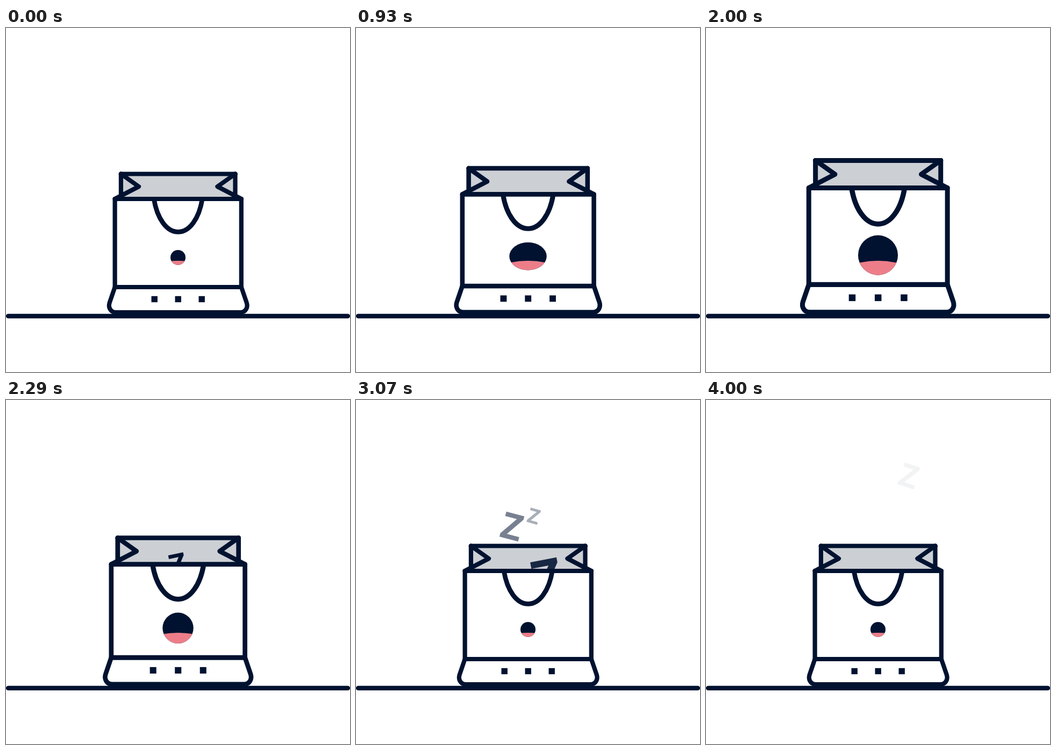
Write an HTML page with a canvas that moves like this. It is 640 px wide and 640 px high and loops after 4.71 s.

```html
<!DOCTYPE html>
<html lang="en">
<head>
<meta charset="utf-8">
<title>Yawning bag</title>
<style>
  html, body { margin: 0; width: 100%; height: 100%; overflow: hidden; background: #fff; }
  canvas { display: block; width: 100%; height: 100%; }
</style>
</head>
<body>
<canvas id="stage" width="640" height="640"></canvas>
<script>
const ctx = document.getElementById('stage').getContext('2d');
const NAVY = '#001230', GREY = '#cccfd4', PINK = '#ed7e89';
const LOOP = 4710, FPS = 14, LAST_STEP = 56;
const CENTER = 320, FLOOR = 532;

// Bag measures from the middle of its foot; widths are halves
const BACK = 106.3, BODY = 117.6, RIM = -214, TOP = -260.5, FOLD = -50, FOOT = -3;

// Where and when each Z fades out, and its height then
const ZS = [
  { end: 3450, x: 333, y: 185.5, size: 21.8 },
  { end: 3666, x: 296, y: 160, size: 34.1 },
  { end: 4055, x: 378.3, y: 133, size: 41 }
];

function smooth(from, to, t) {
  const u = Math.min(1, Math.max(0, (t - from) / (to - from)));
  return u * u * (3 - 2 * u);
}

function strokeLine(...points) {
  ctx.beginPath();
  points.forEach(([x, y]) => ctx.lineTo(x, y));
  ctx.stroke();
}

function inBagSpace(scale, draw) {
  ctx.save();
  ctx.translate(CENTER + .2, FLOOR);
  ctx.scale(scale, scale);
  ctx.lineWidth = 8.2;
  draw();
  ctx.restore();
}

function drawBack() {
  ctx.fillStyle = GREY;
  ctx.fillRect(-BACK, TOP, BACK * 2, RIM - TOP);
  strokeLine([-BACK, TOP], [BACK, TOP]);
  for (const side of [-1, 1]) {
    strokeLine([side * BACK, TOP], [side * BACK, RIM - 6]);
    strokeLine([side * BACK, TOP], [side * 73.2, -237], [side * BODY, RIM]);
  }
}

function drawFront() {
  ctx.fillStyle = '#fff';
  ctx.beginPath();
  ctx.moveTo(-BODY, FOLD);
  ctx.lineTo(-127.5, -21);
  ctx.bezierCurveTo(-130.5, -12, -125.5, FOOT, -116, FOOT);
  ctx.lineTo(116, FOOT);
  ctx.bezierCurveTo(125.5, FOOT, 130.5, -12, 127.5, -21);
  ctx.lineTo(BODY, FOLD);
  ctx.closePath();
  ctx.fill();
  ctx.stroke();

  ctx.fillRect(-BODY, RIM, BODY * 2, FOLD - RIM);
  ctx.strokeRect(-BODY, RIM, BODY * 2, FOLD - RIM);

  ctx.lineWidth = 8.7;
  ctx.lineCap = 'butt';
  ctx.beginPath();
  ctx.moveTo(-45, RIM);
  ctx.bezierCurveTo(-39, -177, -21, -152.6, 0, -152.6);
  ctx.bezierCurveTo(21, -152.6, 39, -177, 45, RIM);
  ctx.stroke();

  ctx.fillStyle = NAVY;
  for (const x of [-44, 0, 44]) ctx.fillRect(x - 5.7, -33.2, 11.4, 11.4);
}

function drawMouth(rx, ry) {
  ctx.save();
  ctx.beginPath();
  ctx.ellipse(CENTER, 429.5 - .185 * ry, rx, ry, 0, 0, Math.PI * 2);
  ctx.fillStyle = NAVY;
  ctx.fill();
  ctx.clip();
  ctx.beginPath();
  ctx.arc(CENTER, 433 + 165, 165, 0, Math.PI * 2);
  ctx.fillStyle = PINK;
  ctx.fill();
  ctx.restore();
}

// A Z drifts up steadily, with one swing to the right as it leaves the bag
function drawZ(z, t) {
  const left = z.end - t;
  if (left <= 0 || left > 1430) return;
  const swing = smooth(570, 990, left);
  const em = z.size * (1 + .0007 * left) / .714;
  ctx.save();
  ctx.globalAlpha = Math.min(1, left * .0009);
  ctx.translate(
    z.x - z.size * (.00027 * left + .3 * swing),
    z.y + z.size * (.0037 * left + 1.2 * swing)
  );
  ctx.rotate((18 - .005 * left - 24 * swing) * Math.PI / 180);
  ctx.font = `bold ${em}px "Open Sans", "Noto Sans", sans-serif`;
  ctx.textAlign = 'center';
  ctx.fillStyle = NAVY;
  ctx.fillText('Z', 0, em * .357);
  ctx.restore();
}

function render(t) {
  ctx.fillStyle = '#fff';
  ctx.fillRect(0, 0, 640, 640);
  ctx.strokeStyle = NAVY;
  ctx.lineCap = ctx.lineJoin = 'round';

  // A first breath, a deeper one, then both are let go
  const inhale = smooth(0, 900, t), fill = smooth(900, 1570, t);
  const air = 1 - smooth(1900, 2760, t), open = 1 - smooth(1950, 2765, t);
  const scale = 1 + (.04 * inhale + .06 * fill) * air;

  inBagSpace(scale, drawBack);
  ZS.forEach(z => drawZ(z, t));
  inBagSpace(scale, drawFront);
  drawMouth(14 + (20.7 * inhale + 2.6 * fill) * open, 14 + (11.8 * inhale + 11.5 * fill) * open);

  ctx.lineWidth = 8.5;
  strokeLine([4.2, 536], [635.8, 536]);
}

// The motion advances in even steps, then rests until the loop ends
function tick() {
  const step = Math.floor((performance.now() % LOOP + 5) * FPS / 1000);
  render(Math.min(step, LAST_STEP) * 1000 / FPS);
  requestAnimationFrame(tick);
}
tick();
</script>
</body>
</html>
```
